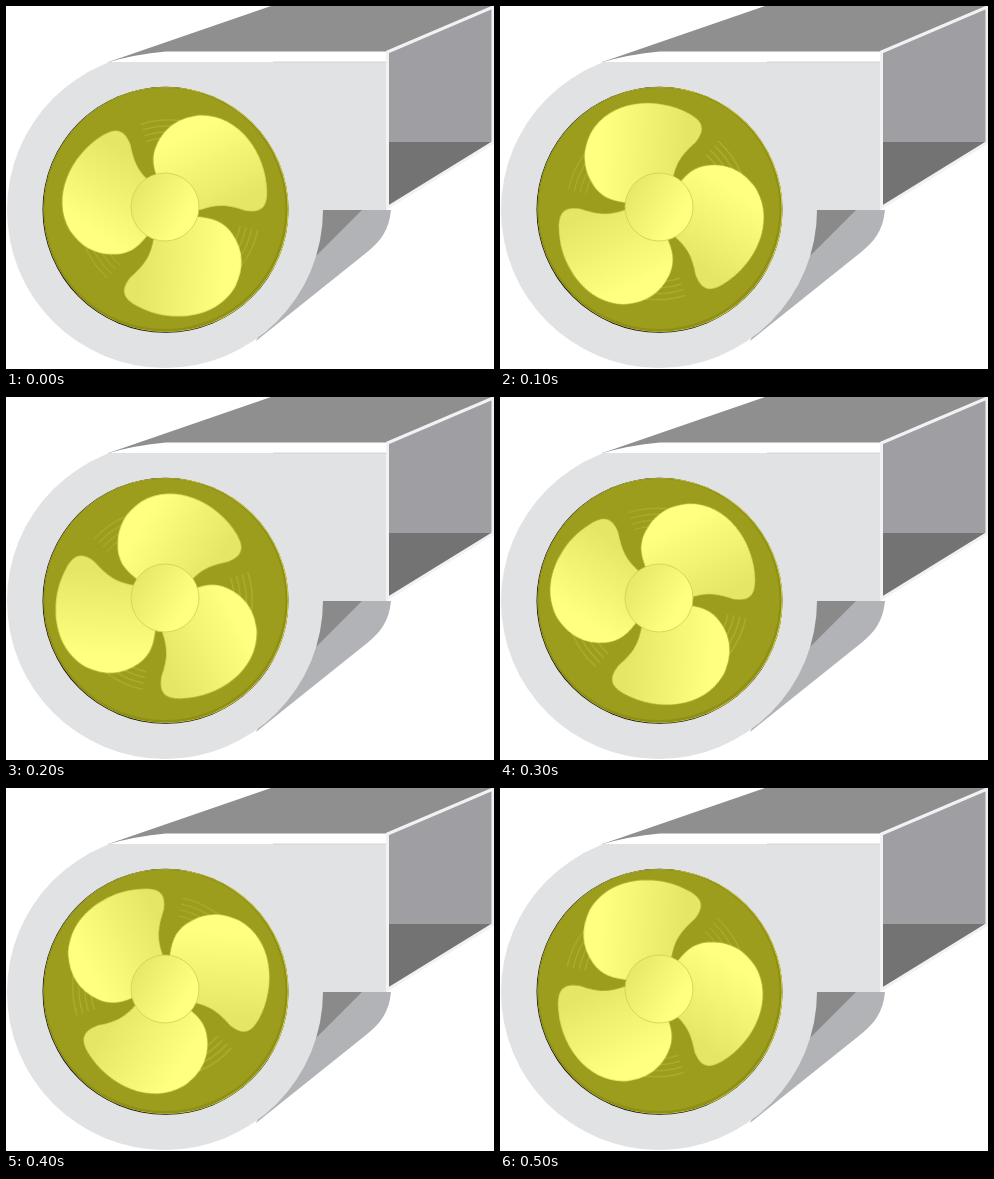
Write an HTML page without scripts that moves like this. It is 488 px wide and 363 px high and loops after 0.6 s.

```html
<!DOCTYPE html>
<html lang="en">
<head>
<meta charset="utf-8">
<title>Blower fan</title>
<style>
  html, body { margin: 0; width: 100%; height: 100%; overflow: hidden; background: #fff; }
  svg { display: block; width: 100vw; height: 100vh; }
  .streaks { fill: none; stroke: #c4c43c; stroke-width: 0.8; stroke-dasharray: 26 334; opacity: 0.75; }
  .rotor { animation: spin 600ms step-end infinite; }
  /* the rotor wobbles slightly around the hub as it turns */
  @keyframes spin {
    0%      { transform: translate(162.7px, 204.7px) rotate(0deg); }
    16.667% { transform: translate(157.3px, 202.8px) rotate(60deg); }
    33.333% { transform: translate(155.3px, 203.3px) rotate(90deg); }
    50%     { transform: translate(156.7px, 202.2px) rotate(120deg); }
    66.667% { transform: translate(157.7px, 199.2px) rotate(150deg); }
    83.333% { transform: translate(156.3px, 197.8px) rotate(180deg); }
  }
</style>
</head>
<body>
<svg viewBox="0 0 488 363" preserveAspectRatio="none">
  <defs>
    <linearGradient id="bladeFill" gradientUnits="userSpaceOnUse" x1="24" y1="-78" x2="62" y2="-2">
      <stop offset="0" stop-color="#ffff80"/>
      <stop offset="1" stop-color="#e6e666"/>
    </linearGradient>
    <linearGradient id="hubFill" x1="0" y1="0.2" x2="1" y2="0.8">
      <stop offset="0" stop-color="#e6e666"/>
      <stop offset="0.8" stop-color="#ffff80"/>
    </linearGradient>
    <g id="blade">
      <g class="streaks" transform="rotate(-108)">
        <circle r="73" pathLength="360"/>
        <circle r="79" pathLength="360"/>
        <circle r="85" pathLength="360"/>
        <circle r="91" pathLength="360"/>
      </g>
      <path fill="url(#bladeFill)" d="M-8-25C-16-42-18-53-12-66C-3-85 12-94 32-95.500C70-96 97.500-58 98.300-19C98.500-2 91 2 77 0C59-6 49-7 32-1L0 0Z"/>
    </g>
  </defs>

  <!-- duct -->
  <path fill="#9f9fa3" d="M382 46L487 1V137H382Z"/>
  <path fill="#737374" d="M382 136H487V137L382 201Z"/>

  <!-- foot -->
  <path fill="#b2b3b7" d="M310 204H385C383 224 375 235 360 247L250 335Z"/>
  <path fill="#8a8a8a" d="M310 204H356L308 252Z"/>

  <!-- housing -->
  <circle cx="159" cy="204" r="158" fill="#e1e2e4"/>
  <path fill="#8f8f8f" d="M101 56.500L265 0H488L382 46V56Z"/>
  <path fill="#fff" d="M103 56Q128 48.500 160 45.500H381V56Z"/>
  <path fill="#e1e2e4" d="M102 56H381V204H159Z"/>
  <path stroke="#c8c8ca" stroke-width="0.700" d="M267 56H381"/>
  <path fill="none" stroke="#f2f2f4" stroke-width="3" d="M381.500 46L487 1V136.500L381.500 201.500Z"/>

  <!-- fan opening -->
  <circle cx="159.500" cy="203.800" r="123" fill="#111"/>
  <circle cx="160" cy="203.500" r="122.600" fill="#d8d84a"/>
  <circle cx="159.500" cy="203.500" r="122.200" fill="#8f8f18"/>
  <circle cx="159" cy="202.500" r="120.500" fill="#9c9c1d"/>

  <g class="rotor">
    <use href="#blade"/>
    <use href="#blade" transform="rotate(120)"/>
    <use href="#blade" transform="rotate(240)"/>
  </g>
  <circle cx="159" cy="201" r="34" fill="url(#hubFill)" stroke="#d0d04e" stroke-width="0.800"/>
</svg>
</body>
</html>
```
